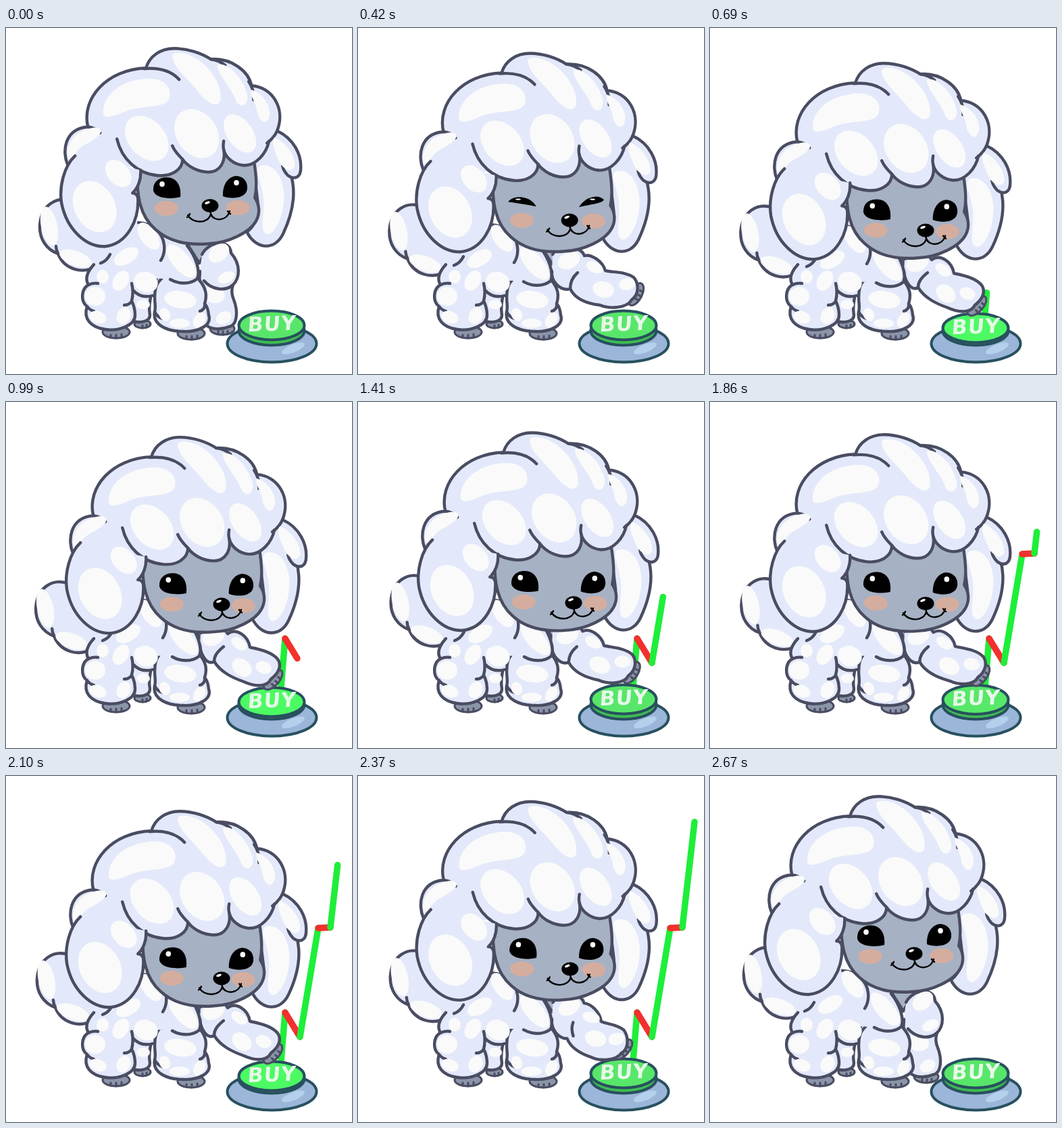
An HTML page for the animation above (2.7 s loop, 512 by 512 pixels).

```html
<!DOCTYPE html>
<html lang="en">
<head>
<meta charset="utf-8">
<title>Poodle pressing a button</title>
<style>
  html, body { margin: 0; width: 100%; height: 100%; overflow: hidden; background: #fff; }
  svg { display: block; width: 100vw; height: 100vh; }
  .fur, .skin, .line { stroke: #4a4c61; stroke-width: 4.4; stroke-linecap: round; stroke-linejoin: round; }
  .fur { fill: #e3e9fa; }
  .skin { fill: #a6b1c4; }
  .line { fill: none; }
  .bare { fill: #e3e9fa; }
  .shine { fill: #fafafa; }
  .toes { fill: #8b94a9; stroke: #4a4c61; stroke-width: 3; stroke-linecap: round; }
  .mouth { fill: none; stroke: #000; stroke-width: 2.4; stroke-linecap: round; }
  .blush { fill: #d5ad9e; }
  #button { stroke: #28505f; stroke-width: 4; }
  #button text { font: 700 30px "DejaVu Sans", sans-serif; letter-spacing: 1px; fill: #e6f8e8; stroke: none; }
  #chart line { stroke-width: 9.5; stroke-linecap: round; }
</style>
</head>
<body>
<svg viewBox="0 0 512 512">
  <g id="chart"></g>

  <g id="button">
    <ellipse cx="393.500" cy="467" rx="66" ry="27.500" fill="#9bb6d8"/>
    <ellipse cx="425" cy="474" rx="18" ry="6" transform="rotate(-22 425 474)" fill="#b3d0ec" stroke="none"/>
    <ellipse cx="393" cy="448" rx="48.500" ry="21.500" fill="#3fbb54"/>
    <g id="cap">
      <ellipse id="top" cx="393" cy="440" rx="48.500" ry="21.500"/>
      <text text-anchor="middle" transform="translate(393 448) rotate(-2) skewX(-6)">BUY</text>
    </g>
  </g>

  <g id="tail">
    <path class="fur" d="M100,257 C75,247 52,262 50,292 C49,312 60,328 77,334 C85,355 112,368 138,350 L150,300"/>
    <path class="line" d="M77,334 C75,330 74,327 74,323"/>
    <g class="shine" data-blobs="64 293 12 29 -12, 103 341 25 11 20"></g>
  </g>

  <g class="toes" transform="translate(202 438)"><ellipse rx="12" ry="6"/><path d="M0,2v4M6,1v4"/></g>
  <path class="fur" d="M188,385 L216,390 C212,405 211,415 213,425 C213,434 200,437 188,434"/>
  <path class="skin" id="neck" d="M262,310 L308,312 L286,348 Z"/>

  <g id="arm">
    <g class="toes" id="paw"><ellipse rx="18" ry="9"/><path d="M-6,3v5M1,4v5M8,3v5"/></g>
    <path class="fur" id="armShape"/>
    <g class="shine" id="armShine"></g>
    <path class="line" id="armCurl"/>
  </g>

  <path class="bare" d="M125,355 L150,290 L195,285 L270,322 C284,345 290,365 283,373 L240,400 L216,397 C205,399 195,396 188,390 L130,390 Z"/>
  <path class="line" d="M188,388 C196,397 206,399 217,396"/>
  <g class="toes" transform="translate(163 450)"><ellipse rx="20" ry="9"/><path d="M-8,4v4M0,4v5M8,3v4"/></g>
  <path class="fur" d="M130,350 C119,362 117,372 122,380 C111,386 110,405 120,412 C114,430 125,443 147,446 C167,449 191,440 191,425 C191,415 188,408 186,404 C188,396 188,386 186,378"/>
  <path class="line" d="M122,380 C127,378 131,377 136,378 M120,412 C123,416 126,418 130,419 M186,404 C184,408 180,410 175,410"/>
  <g class="toes" transform="translate(274 452)"><ellipse rx="20" ry="9"/><path d="M-7,4v4M1,4v5M9,3v4"/></g>
  <path class="fur" d="M236,355 C223,366 219,375 222,383 C217,400 223,410 220,420 C216,440 240,449 262,449 C285,450 305,440 300,425 C299,415 296,410 294,408 C298,395 296,385 286,373"/>
  <path class="line" d="M222,383 C224,377 227,374 230,371 M294,408 C295,414 291,418 287,419 M220,420 C223,426 227,429 232,430"/>
  <g id="chest">
    <path class="bare" d="M196,288 L266,320 C281,340 288,360 283,371 C270,381 252,379 238,371 L200,370 L150,340 Z"/>
    <path class="line" d="M268,322 C281,338 288,360 283,371 C272,380 255,379 243,372 M196,288 C216,289 232,302 234,321 C235,330 233,338 229,344 M140,348 C146,346 151,341 154,335"/>
    <g class="shine" data-blobs="211 308 12 23 -35, 178 338 20 11 -30, 259 345 13 30 -40"></g>
  </g>
  <g class="shine" data-blobs="207 376 18 15 20, 143 368 9 10 0, 170 374 11 16 30, 132 397 15 14 0, 136 428 13 9 20, 174 426 10 13 25, 203 409 10 7 0, 258 402 24 13 8, 235 424 8 10 -20, 257 437 15 7 0, 286 432 8 12 30"></g>

  <g id="head">
    <g class="sag">
      <path class="bare" d="M364,190 L390,160 L416,203 L424,218 Z"/>
      <path class="fur" d="M366,190 C369,230 374,260 374,265 C372,290 362,300 357,302 C370,329 399,331 411,305 C425,275 431,245 422,217"/>
      <path class="shine" d="M375,206 C392,198 410,215 412,245 C414,275 400,305 388,306 C375,304 383,280 382,255 C380,230 369,215 375,206"/>
    </g>
    <path class="skin" id="face" d="M196,200 C192,250 200,280 222,299 C245,320 275,322 300,320 C330,319 362,303 371,286 C377,275 376,262 369,252 C373,235 371,215 365,180 Z"/>
    <g id="eyes">
      <ellipse class="blush" cx="237" cy="267" rx="17.500" ry="11"/>
      <ellipse class="blush" cx="343" cy="266" rx="17.500" ry="11"/>
      <path id="leftEye"/><path id="rightEye"/>
      <ellipse class="shine" id="leftGlint"/><ellipse class="shine" id="rightGlint"/>
    </g>
    <g id="muzzle">
      <ellipse cx="302" cy="263" rx="12.500" ry="10"/>
      <ellipse class="shine" cx="298" cy="258.500" rx="4" ry="1.800" transform="rotate(-20 298 258.500)"/>
      <path class="mouth" d="M302,270 L303,275 M269,277 C276,290 300,290 303,275 C307,287 327,286 331,271 M268,280 C270,279 271,278 272,275 M328,271 C330,273 331,275 332,275"/>
    </g>
    <path class="bare" id="hairFill"/>
    <path class="line" id="hairLine"/>
    <path class="line" d="M205,61 C228,59 246,65 257,77 M304,47 C312,48 319,51 325,56 M360,80 C366,89 368,97 367,107 M402,153 C399,160 394,166 387,171 M122,147 C130,148 136,151 140,156 M262,195 C256,189 250,183 247,175 M323,181 C322,177 322,173 323,168"/>
    <path class="shine" d="M145,129 C142,105 165,80 205,76 C235,73 248,90 242,106 C235,121 200,114 175,125 C160,132 148,135 145,129 M247,44 C245,35 262,36 275,42 C302,55 322,85 318,108 C313,122 295,108 285,95 C270,75 250,62 247,44 M314,55 C330,51 354,78 358,101 C359,118 345,120 340,106 C335,90 312,68 314,55 M363,92 C377,95 392,112 391,129 C387,149 374,138 372,123 C371,112 362,102 363,92 M92,190 C90,165 112,149 134,148 C151,151 135,165 118,173 C102,181 96,205 92,190 M398,163 C415,170 430,190 428,206 C422,217 410,209 404,196 C399,184 392,170 398,163"/>
    <g class="shine" data-blobs="209 164 27 38 -42, 283 157 30 39 -35, 347 157 19 32 -35"></g>
    <g class="sag">
      <path class="fur" d="M103,190 C87,205 79,235 83,260 C91,300 120,325 147,324 C180,321 198,285 196,252 C195,248 193,245 188,245 C196,238 201,225 200,211"/>
      <g class="shine" data-blobs="132 265 30 40 -28, 167 216 16 23 -42"></g>
    </g>
  </g>
</svg>

<script>
const LOOP = 2700, STEP = 30;
const $ = id => document.getElementById(id);
const make = (tag, parent, attrs = {}) => {
  const el = document.createElementNS('http://www.w3.org/2000/svg', tag);
  for (const k in attrs) el.setAttribute(k, attrs[k]);
  return parent.appendChild(el);
};
const set = (id, name, value) => $(id).setAttribute(name, value);
const move = (el, x, y, more = '') => el.setAttribute('transform', `translate(${x} ${y}) ${more}`);
const clamp = x => Math.max(0, Math.min(1, x));
const ramp = (t, from, to) => { const u = clamp((t - from) / (to - from)); return u * u * (3 - 2 * u); };
const bump = (t, mid, half) => Math.cos(Math.PI / 2 * Math.min(1, Math.abs(t - mid) / half)) ** 2;

// Blend two strings of the same form, number by number
const NUM = /-?\d+(\.\d+)?/g;
const mix = (a, b, u) => {
  const to = b.match(NUM);
  let i = 0;
  return a.replace(NUM, v => +v + (to[i++] - v) * u);
};

for (const g of document.querySelectorAll('[data-blobs]'))
  for (const blob of g.dataset.blobs.split(', ')) {
    const [x, y, rx, ry, turn] = blob.split(' ');
    make('ellipse', g, { rx, ry, transform: `translate(${x} ${y}) rotate(${turn})` });
  }

const crown = 'M92,203 C84,185 86,150 122,147 C112,105 150,62 208,60 C213,42 230,31 250,31 C270,31 290,38 304,47 C335,45 360,65 364,86 C395,88 415,120 402,153 C428,165 438,190 437,208 C437,222 428,226 418,219 C414,215 411,211 410,205';
const fringe = '390,168 C386,187 370,205 352,204 C338,203 326,193 323,181 C326,198 318,214 300,214 C285,214 270,206 262,195 C262,211 245,221 225,219 C195,216 172,195 165,165';
set('hairFill', 'd', `${crown} L${fringe} L188,206 L110,215 Z`);
set('hairLine', 'd', `${crown} M${fringe}`);

// Arm poses: standing, raised, pressing
const armShape = [
  'M290,335 C300,315 332,312 333,333 C348,350 346,370 336,380 C333,388 334,395 337,402 C344,420 342,440 330,442 C318,447 303,446 297,440 C298,425 290,410 292,398 C288,385 285,375 287,360',
  'M288,335 C298,318 330,322 335,337 C345,334 362,345 366,359 C378,362 395,360 408,369 C416,378 416,395 405,402 C398,415 372,416 358,410 C340,408 322,402 314,386 C300,390 285,375 287,360',
  'M288,342 C298,328 322,332 328,343 C340,334 358,345 361,363 C375,366 395,370 403,382 C408,392 402,402 392,410 C385,424 365,420 352,414 C335,408 318,400 308,384 C298,390 288,375 287,360'];
const armCurl = [
  'M336,380 C325,390 305,388 293,374',
  'M314,386 C314,375 318,368 325,362',
  'M308,384 C308,376 312,370 322,362'];
const place = (x, y, turn) => `translate(${x} ${y}) rotate(${turn})`;
const paw = [place(320, 445, 0), place(411, 394, -62), place(395, 411, -48)];
const armShine = [
  [17, 12, place(315, 333, -40), place(312, 344, -25), place(307, 348, -25)],
  [13, 8, place(326, 369, -25), place(350, 354, 25), place(345, 358, 35)],
  [16, 12, place(308, 395, 10), place(363, 387, 15), place(349, 393, 40)],
  [12, 9, place(322, 429, -30), place(398, 379, -10), place(381, 393, 20)],
].map(([rx, ry, ...poses]) => ({ el: make('ellipse', $('armShine'), { rx, ry }), poses }));

const leftEye = [
  'M218,241 C217,226 228,221 238,221 C251,221 260,232 258,250 C248,253 222,254 218,241',
  'M216,240 C222,233 230,232 238,233 C248,234 254,240 258,246 C248,244 232,242 216,240'];
const rightEye = [
  'M357,238 C358,226 350,219 340,219 C330,220 320,230 321,249 C330,253 355,254 357,238',
  'M358,234 C352,229 346,229 340,231 C332,233 326,238 321,246 C334,242 356,240 358,234'];

// Price line, drawn at constant speed
const price = [[407, 422], [413, 350], [435, 386], [462, 225], [480, 224], [498, 68]];
const bars = price.slice(1).map((p, i) =>
  make('line', $('chart'), { x1: price[i][0], y1: price[i][1], stroke: i % 2 ? '#f4302d' : '#1fee3a' }));

function drawChart(t) {
  let left = t < 2400 ? (t - 570) * 0.254 : 0;
  bars.forEach((bar, i) => {
    const [x, y] = price[i], [dx, dy] = [price[i + 1][0] - x, price[i + 1][1] - y];
    const size = Math.hypot(dx, dy), u = clamp(left / size);
    bar.setAttribute('x2', x + dx * u);
    bar.setAttribute('y2', y + dy * u);
    bar.setAttribute('visibility', u > 0 ? 'visible' : 'hidden');
    left -= size;
  });
}

const tailKeys = [[0, 0], [420, 8], [990, 13], [1410, 3], [1650, 7], [2100, 9], [2670, 0], [2700, 0]];
function tailDrop(t) {
  const i = tailKeys.findIndex(k => k[0] > t), [t0, a] = tailKeys[i - 1], [t1, b] = tailKeys[i];
  return a + (b - a) * ramp(t, t0, t1);
}

function draw(t) {
  const lean = ramp(t, 20, 680) * (1 - ramp(t, 2200, 2660));
  const reach = ramp(t, 20, 410) * (1 - ramp(t, 2250, 2660));
  const dip = t > 540 && t < 2160 ? bump(t % 540, 310, 150) : 0;
  const press = ramp(t, 420, 540) * (1 - 0.65 * dip) * (1 - ramp(t, 2190, 2340));
  const down = clamp((press - 0.6) / 0.4);
  const blink = Math.min(1, 1.6 * bump(t, 420, 130));
  const pose = p => mix(mix(p[0], p[1], reach), p[2], press * reach);

  drawChart(t);
  move($('cap'), 0, 4 * down);
  set('top', 'fill', `rgb(${88 - 12 * down},${230 + 20 * down},${106 - 6 * down})`);

  const drop = tailDrop(t);
  move($('tail'), -drop * 0.45, drop * 0.95);
  move($('chest'), 3 * lean, 5 * lean);
  move($('neck'), 2 * lean, 2 * lean);

  set('armShape', 'd', pose(armShape));
  set('armCurl', 'd', pose(armCurl));
  set('paw', 'transform', pose(paw));
  for (const { el, poses } of armShine) el.setAttribute('transform', pose(poses));

  const headX = 8 * lean - 0.8, headY = 11.2 * lean + 10.8 * press - 0.8;
  move($('head'), headX, headY);
  for (const el of document.querySelectorAll('.sag')) move(el, 0, lean - 4 * press);
  move($('face'), 0, 6 * lean - 7 * press);
  move($('eyes'), 9 * lean - headX, 27 * lean + 5.4 * press - headY, `rotate(${1.6 * lean} 238 240)`);
  move($('muzzle'), 17 * lean - headX, 32.7 * lean + 3.8 * press - headY);

  set('leftEye', 'd', mix(...leftEye, blink));
  set('rightEye', 'd', mix(...rightEye, blink));
  for (const [id, x, y] of [['leftGlint', 231, 231], ['rightGlint', 341, 229]]) {
    set(id, 'cx', x);
    set(id, 'cy', y + 5 * blink);
    set(id, 'rx', 3.8);
    set(id, 'ry', 4 - 3 * blink);
  }
}

const start = performance.now();
(function frame() {
  const t = (performance.now() - start) % LOOP;
  draw(Math.floor(t / STEP) * STEP);
  requestAnimationFrame(frame);
})();
</script>
</body>
</html>
```
